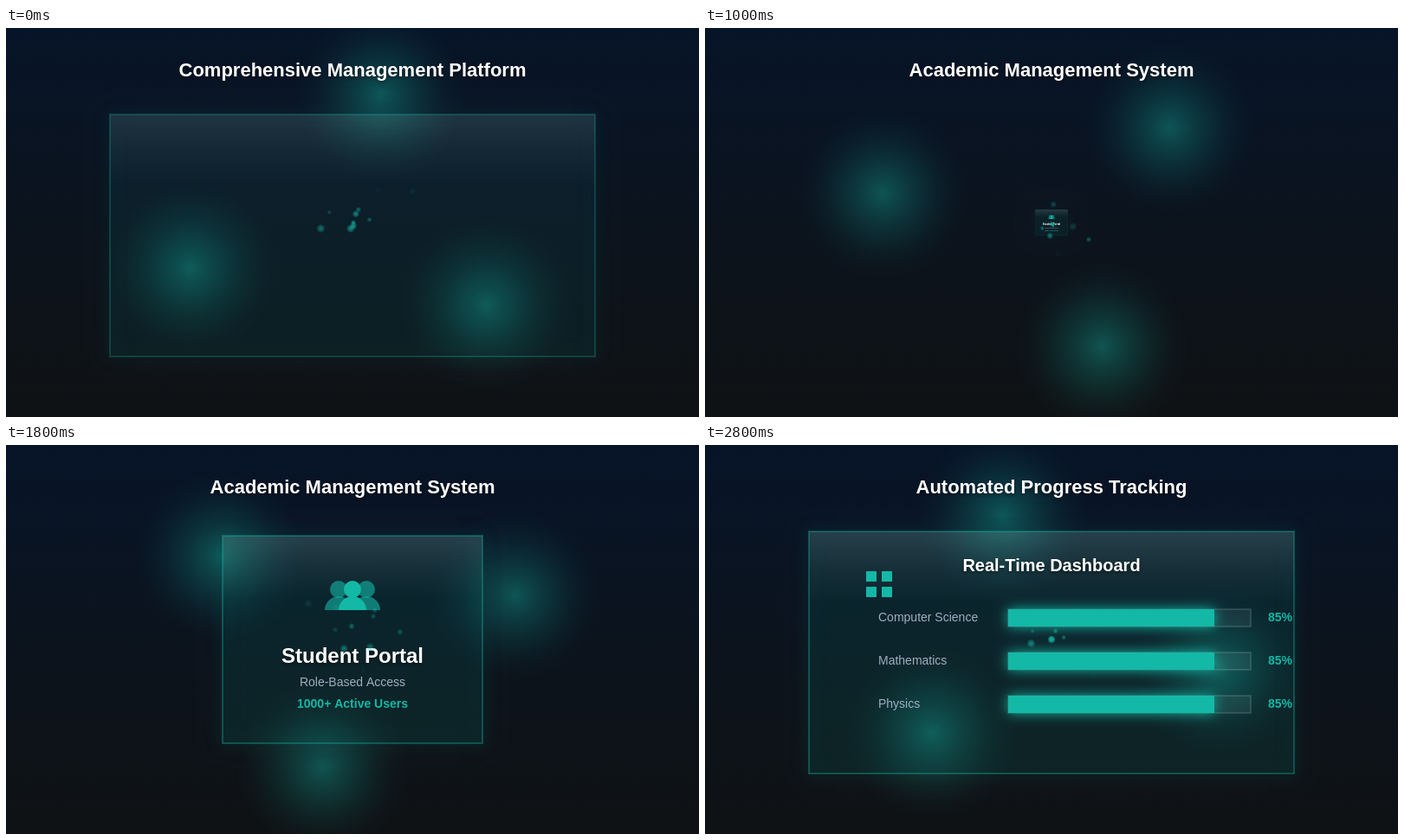
Recreate the animation shown at these times as an HTML page with a canvas. Size 800 by 450 pixels, loop 2.9 s.

```html
<!DOCTYPE html>
<html lang="en">
<head>
<meta charset="utf-8">
<title>Management platform</title>
<style>
  html, body { margin: 0; width: 100%; height: 100%; overflow: hidden; background: #0a121c; }
  canvas { display: block; }
</style>
</head>
<body>
<canvas id="stage" width="800" height="450"></canvas>
<script>
const ctx = document.getElementById('stage').getContext('2d');
const LOOP = 2900, STEP = 100, CX = 400, CY = 225;
const TEAL = '#14b8a6', MUTED = '#a0aec0';
const teal = a => `rgba(20,184,166,${a})`;
const white = a => `rgba(255,255,255,${a})`;
const clamp = v => Math.max(0, Math.min(1, v));

function seededRandom(seed) {
  return () => (seed = seed * 16807 % 2147483647) / 2147483647;
}

const random = seededRandom(2024);
const sparks = Array.from({ length: 32 }, () => ({
  birth: random() * LOOP,
  angle: random() * Math.PI * 2,
  reach: 30 + random() * 90,
  radius: 2.5 + random() * 2.5
}));

function withShadow(color, blur, offsetY, draw) {
  ctx.save();
  ctx.shadowColor = color;
  ctx.shadowBlur = blur;
  ctx.shadowOffsetY = offsetY;
  draw();
  ctx.restore();
}

function text(str, x, y, size, color = '#fff', bold = true, align = 'center') {
  ctx.font = `${bold ? 'bold ' : ''}${size}px "Liberation Sans", Arial, sans-serif`;
  ctx.textAlign = align;
  ctx.fillStyle = color;
  ctx.fillText(str, x, y);
}

function heading(str, x, y, size) {
  withShadow('rgba(0,0,0,0.5)', 4, 2, () => text(str, x, y, size));
}

function disc(x, y, r, color, from = 0) {
  ctx.fillStyle = color;
  ctx.beginPath();
  ctx.arc(x, y, r, from, Math.PI * 2);
  ctx.fill();
}

// Teal spot whose opacity falls off smoothly to zero at the rim
function softDisc(x, y, r, alpha, falloff) {
  const g = ctx.createRadialGradient(x, y, 0, x, y, r);
  for (let k = 0; k <= 1; k += 0.125) g.addColorStop(k, teal(alpha * (1 - k) ** falloff));
  disc(x, y, r, g);
}

function background() {
  const g = ctx.createLinearGradient(0, 0, 0, 450);
  g.addColorStop(0, '#071428');
  g.addColorStop(0.5, '#0b131d');
  g.addColorStop(1, '#0f1214');
  ctx.fillStyle = g;
  ctx.fillRect(0, 0, 800, 450);
}

function glows(t) {
  for (let i = 0; i < 3; i++) {
    const a = 0.687 + t * 0.0005875 + i * Math.PI * 2 / 3;
    softDisc(CX + 200 * Math.cos(a), CY + 150 * Math.sin(a), 100, 0.4, 1.6);
  }
}

function card(x, y, w, h, strength) {
  withShadow(TEAL, 20, 0, () => {
    ctx.fillStyle = teal(0.05 * strength);
    ctx.fillRect(x, y, w, h);
  });
  const shine = ctx.createLinearGradient(0, y, 0, y + h * 0.3);
  shine.addColorStop(0, white(0.12 * strength));
  shine.addColorStop(0.5, white(0.05 * strength));
  shine.addColorStop(1, white(0));
  ctx.fillStyle = shine;
  ctx.fillRect(x, y, w, h * 0.3);
  withShadow(TEAL, 20, 0, () => {
    ctx.strokeStyle = teal(0.34 * strength);
    ctx.lineWidth = 2;
    ctx.strokeRect(x, y, w, h);
  });
}

function drawSparks(t) {
  for (const { birth, angle, reach, radius } of sparks) {
    const age = (t - birth + LOOP) % LOOP / 900;
    if (age >= 1) continue;
    const d = reach * age;
    softDisc(CX + d * Math.cos(angle), CY + d * Math.sin(angle), radius, 0.8 * (1 - age), 0.7);
  }
}

function statusScene(t, local) {
  card(120, 100, 560, 280, 0.75);
  const scale = 1 - (1 - local * 0.789) ** 2;
  if (scale > 0) {
    ctx.save();
    ctx.translate(CX, CY);
    ctx.scale(scale, scale);
    withShadow(teal(0.7), 30, 0, () => disc(0, 0, 100, TEAL));
    ctx.strokeStyle = '#fff';
    ctx.lineWidth = 12;
    ctx.lineCap = 'round';
    ctx.beginPath();
    ctx.moveTo(-40, 0);
    ctx.lineTo(-15, 30);
    ctx.lineTo(45, -36);
    ctx.stroke();
    ctx.restore();
  }
  drawSparks(t);
  if (scale > 0.5) {
    heading('System Operational', CX, 310, 18);
    text('Real-Time Grading Active', CX, 334, 14, TEAL, false);
  }
}

function person(x, alpha) {
  disc(x, -58, 10, teal(alpha));
  disc(x, -34, 16, teal(alpha), Math.PI);
}

function portalScene(t, local) {
  const scale = 1 - (1 - clamp(local * 1.25)) ** 3;
  ctx.save();
  ctx.translate(CX, CY);
  ctx.scale(scale, scale);
  card(-150, -120, 300, 240, 1);
  person(-16, 0.6);
  person(16, 0.6);
  person(0, 1);
  heading('Student Portal', 0, 27, 24);
  text('Role-Based Access', 0, 54, 14, MUTED, false);
  text('1000+ Active Users', 0, 79, 14, TEAL);
  ctx.restore();
  drawSparks(t);
}

function dashboardScene(t, local) {
  card(120, 100, 560, 280, 1);
  heading('Real-Time Dashboard', CX, 146, 20);
  ctx.fillStyle = TEAL;
  for (const x of [186, 204]) for (const y of [146, 164]) ctx.fillRect(x, y, 12, 12);
  ['Computer Science', 'Mathematics', 'Physics'].forEach((name, i) => {
    const y = 190 + i * 50;
    const value = 85 * clamp(local * 2 - i * 0.3);
    text(name, 200, y + 14, 14, MUTED, false, 'left');
    ctx.fillStyle = white(0.06);
    ctx.fillRect(350, y, 280, 20);
    ctx.strokeStyle = white(0.12);
    ctx.lineWidth = 2;
    ctx.strokeRect(350, y, 280, 20);
    withShadow(TEAL, 15, 0, () => {
      ctx.fillStyle = TEAL;
      if (value > 0) ctx.fillRect(350, y, value * 2.8, 20);
    });
    text(Math.floor(value + 0.01) + '%', 650, y + 14, 14, TEAL, true, 'left');
  });
  drawSparks(t);
}

const scenes = [
  { title: 'Comprehensive Management Platform', draw: statusScene },
  { title: 'Academic Management System', draw: portalScene },
  { title: 'Automated Progress Tracking', draw: dashboardScene }
];

function render(now) {
  const t = Math.floor(now % LOOP / STEP) * STEP;
  const progress = t / LOOP * scenes.length;
  const scene = scenes[Math.floor(progress)];
  background();
  glows(t);
  scene.draw(t, progress % 1);
  heading(scene.title, CX, 56, 22);
}

const start = performance.now();
function tick() {
  render(performance.now() - start);
  requestAnimationFrame(tick);
}
tick();
</script>
</body>
</html>
```
